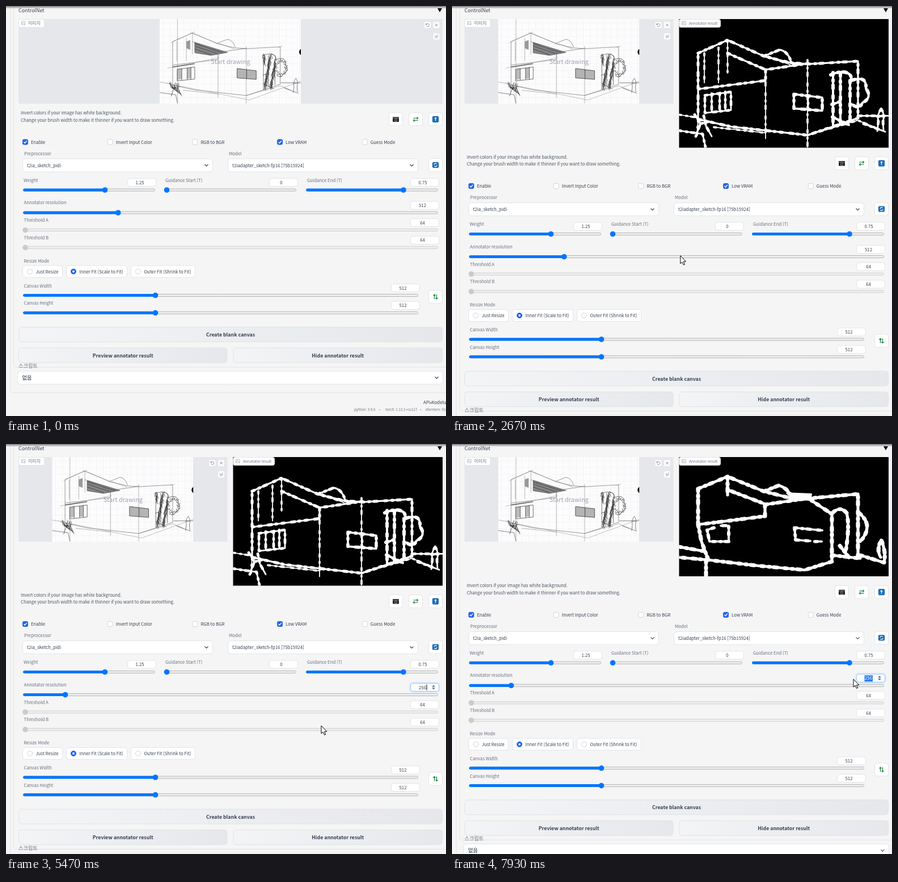
These frames come from a looping animation (776 px wide and 722 px high, 8 s). An HTML page with a canvas:

```html
<!DOCTYPE html>
<html lang="ko">
<head>
<meta charset="utf-8">
<style>
html, body { margin: 0; width: 100%; height: 100%; overflow: hidden; background: #f5f5f5; }
canvas { display: block; }
</style>
</head>
<body>
<canvas id="stage" width="776" height="722"></canvas>
<script>
const c = document.getElementById('stage').getContext('2d');
const FONT = '"Noto Sans CJK KR", "Noto Sans CJK JP", "Noto Sans CJK", "Source Sans Pro", sans-serif';
const BLUE = '#0075ff', LINE = '#e2e4e8', GREY = '#6b7280', DARK = '#374151', BG = '#f5f5f5';
const LOOP = 8000;

// House drawing, in the 370 x 226 space of the annotator result
const WALLS = new Path2D('M34 60L86 37L152 66L198 77L230 79L316 74V174L227 204L92 189L34 176V60' +
  'M86 60L153 89L228 78M153 89V108L34 123M150 65L178 54Q192 56 198 75');
const UPRIGHTS = new Path2D('M86 37V95M70 50V112M153 89V210M227 72V225M45 60V112M34 176L32 204M158 66L196 80' +
  'M227 204L316 178L345 190M0 168L32 173M62 190L153 200');
const WINDOW = new Path2D('M203 132L253 138V161L203 157Z');
const PANES = new Path2D('M46 134L92 128V160L46 165ZM58 131V163M72 130V161M82 128V161M228 134V160');
const TREE = new Path2D('M272 94V188M285 96V182M268 98Q290 88 303 98M292 93Q306 96 304 108' +
  'Q332 98 330 122Q342 138 324 147Q318 160 306 150M270 150L285 145M271 172L300 186M302 108V176');
const PEOPLE = new Path2D('M357 158Q349 168 352 180L350 197M357 158Q364 168 360 180L361 195M350 171H362' +
  'M318 170H370M326 184L364 198M28 168L38 184L30 206M44 170L48 188L58 206M38 184L54 180M0 196L42 202L47 225');
const BLOBS = new Path2D('M34 60L86 37L150 65L198 78L232 78L316 70V190M34 60V128L152 112V89L86 62M86 37V72' +
  'M152 90L228 78M150 65L176 54Q192 58 200 78M34 128L40 160L52 195L140 206L222 214L270 198V108L228 78' +
  'M52 195L0 190M0 170L42 178M48 196V225M320 186L362 200Q366 180 357 157Q348 176 356 190M270 186L320 192' +
  'M272 105Q285 92 296 106Q302 130 294 180M318 106Q345 130 320 160M284 168L300 190');
const BLOB_PANES = new Path2D('M62 134L50 138L54 160H88V130H74M204 134L253 139M204 134L206 157L232 159M240 160H252');

const ARROW = new Path2D('M0 0V14L3.2 11.2L5.6 16.4L7.8 15.4L5.4 10.4H9.8Z');
const HAND = new Path2D('M-1.3 1.4Q0 -.9 1.3 1.4V7.2Q2.8 6 3.8 7.4Q5.2 6.5 6.2 8Q8.7 7.2 8.8 9.8V13Q8.4 16 6.8 18.5' +
  'H-.6Q-2 15 -4.6 11.6Q-4.4 9 -1.3 11.5Z');
const IBEAM = new Path2D('M-2 -6H2M0 -6V6M-2 6H2');

// Pointer path: time, x, y
const MOVES = [[600, 650, 4], [1130, 268, 628], [2470, 268, 628], [2930, 600, 164], [3070, 600, 164],
  [3400, 577, 530], [3870, 736, 428], [3930, 738, 428], [4130, 724, 428], [4270, 708, 430], [5200, 708, 430],
  [5470, 556, 496], [5930, 316, 686], [6800, 316, 686], [7250, 560, 312], [7600, 740, 413],
  [7670, 740, 413], [7930, 708, 414]];

const clamp = (v, a = 0, b = 1) => Math.min(b, Math.max(a, v));

function pointer(t) {
  const i = MOVES.findIndex(m => m[0] > t);
  if (i < 0) return MOVES[MOVES.length - 1].slice(1);
  const [a, b] = [MOVES[Math.max(0, i - 1)], MOVES[i]];
  const p = clamp((t - a[0]) / (b[0] - a[0] || 1)), e = p * p * (3 - 2 * p);
  return [a[1] + (b[1] - a[1]) * e, a[2] + (b[2] - a[2]) * e];
}

function text(s, x, y, size = 7.8, color = GREY, align = 'left', weight = 400) {
  c.font = `${weight} ${size}px ${FONT}`;
  c.fillStyle = color;
  c.textAlign = align;
  c.fillText(s, x, y);
}

function box(x, y, w, h, r = 4, fill = '#fff', stroke = LINE) {
  c.beginPath();
  c.roundRect(x + .5, y + .5, w - 1, h - 1, r);
  c.fillStyle = fill;
  c.fill();
  if (stroke) { c.strokeStyle = stroke; c.lineWidth = 1; c.stroke(); }
}

function path(d, x, y, color, width = 1, fill) {
  c.save();
  c.translate(x, y);
  const p = typeof d === 'string' ? new Path2D(d) : d;
  if (fill) { c.fillStyle = fill; c.fill(p); }
  if (color) { c.strokeStyle = color; c.lineWidth = width; c.stroke(p); }
  c.restore();
}

function dot(x, y, r, fill) {
  c.beginPath();
  c.arc(x, y, r, 0, 7);
  c.fillStyle = fill;
  c.fill();
}

const chevron = (x, y) => path('M-3 -1.5L0 1.5L3 -1.5', x, y, DARK, 1.1);

function slider(x, end, y, knob, off) {
  box(x, y - 2.5, end - x, 5, 2, '#efefef', off ? '#cfcfcf' : '#b4b4b4');
  if (!off) box(x, y - 2.5, knob - x, 5, 2, BLUE, BLUE);
  dot(knob, y, 4.8, off ? '#cbcbcb' : BLUE);
}

function field(x, y, value, tx) {
  box(x, y, 51, 15, 4);
  text(value, tx, y + 10.5, 7.8, DARK, 'center');
}

function select(x, y, w, h, s) {
  box(x, y, w, h, 5);
  text(s, x + 8, y + h / 2 + 3, 7.8, DARK);
  chevron(x + w - 11.5, y + h / 2);
}

function button(x, y, w, h, s, hot) {
  const g = c.createLinearGradient(x, y, x + w, y + h * 3);
  g.addColorStop(0, hot ? '#f9fafb' : '#f3f4f6');
  g.addColorStop(1, hot ? '#f3f4f6' : '#e5e7eb');
  box(x, y, w, h, 5, g, '#e0e2e6');
  text(s, x + w / 2, y + h / 2 + 3.6, 8.75, DARK, 'center', 600);
}

function picIcon(x, y) {
  path('M-3 -3H3V3H-3ZM-3 1.5L0 -.5L3 3M-1.5 -1.5H-.5', x, y, '#9ca3af', .7);
}

function tile(x, y) { box(x - 12, y - 12, 25, 24, 4); }

function swapIcon(x, y, turn) {
  c.save();
  c.translate(x, y);
  c.rotate(turn);
  path('M-4 -2H4M2 -4L4 -2L2 0M4 2H-4M-2 0L-4 2L-2 4', 0, 0, '#15803d', 1.2);
  c.restore();
}

function sketch(x) {
  c.save();
  c.translate(x, 23);
  c.beginPath();
  c.rect(0, 0, 249, 149);
  c.clip();
  c.fillStyle = '#fcfcfd';
  c.fillRect(0, 0, 249, 149);
  c.fillStyle = '#f3f3f6';
  for (let i = 6; i < 249; i += 12) { c.fillRect(i, 0, .7, 149); c.fillRect(0, i, 249, .7); }
  c.save();
  c.scale(.673, .66);
  path('M92 62L178 89L135 97L92 90Z', 0, 0, '#444', 1, '#858585');
  path('M92 66L165 89M92 72L150 92M92 80L135 95', 0, 0, '#444', 1.4);
  path(WINDOW, 0, 0, '#444', 1.3, '#b4b4b4');
  path('M46 134L58 132V160L46 163ZM72 131L82 129V158L72 160Z', 0, 0, null, 0, '#bbb');
  path('M70 60L80 56V82L70 78Z', 0, 0, null, 0, '#999');
  path(WALLS, 0, 0, '#666', 1);
  path(UPRIGHTS, 0, 0, '#777', .8);
  path(PANES, 0, 0, '#444', 1.2);
  path(TREE, 0, 0, '#555', 1.2);
  path(PEOPLE, 0, 0, '#555', 1.1);
  path('M47 0V225M30 63L92 34M80 36L160 68M20 131L156 103M310 76L322 72M20 172L235 216L370 166', 0, 0, '#888', .8);
  path('M34 128L92 119', 0, 0, '#555', 2);
  c.strokeStyle = '#333';
  c.lineWidth = 1.1;
  c.beginPath();
  for (let i = 0; i < 90; i++) {
    const a = 273 + i * 37 % 31, b = 92 + i * 53 % 86;
    c.moveTo(a, b);
    c.quadraticCurveTo(a + i % 7 - 3, b + 6, a + i * 5 % 9 - 4, b + 14);
  }
  for (let i = 0; i < 22; i++) {
    const a = i * 2.4, r = 11 + i % 5;
    c.moveTo(321 + r * Math.cos(a), 128 + 1.5 * r * Math.sin(a));
    c.arc(319 + r * Math.cos(a), 128 + 1.5 * r * Math.sin(a), 2.5, 0, 4);
  }
  for (let i = 0; i < 14; i++) {
    c.moveTo(26 + i * 11 % 32, 168 + i * 7 % 18);
    c.lineTo(29 + i * 13 % 32, 182 + i * 9 % 22);
  }
  c.stroke();
  c.restore();
  dot(252, 58, 6, '#000');
  c.restore();
}

function inputImage(wide) {
  const right = wide ? 770 : 390.5, mid = (22 + right) / 2;
  c.fillStyle = '#e5e7eb';
  c.fillRect(22, 23, right - 22, 149);
  sketch(mid - 125);
  text('Start drawing', mid, 102, 11.05, '#9ca3af', 'center');
  box(22, 23, 46, 15, 3);
  picIcon(30.5, 30);
  text('이미지', 39, 33, 8);
  for (const [x, y] of [[26.5, 33.5], [11, 33.5], [11, 53.5]]) box(right - x - 6.5, y - 6.5, 13, 13, 3);
  path('M-2.5 -1A2.8 2.8 0 1 1 -2 2M-3 -3V-.5H-.5', right - 26.5, 33.5, GREY, .8);
  path('M-2.3 -2.3L2.3 2.3M2.3 -2.3L-2.3 2.3', right - 11, 33.5, GREY, .9);
  path('M-2.5 3L3 -3M-3 -2L-1 0M0 3L3 0', right - 11, 53.5, GREY, .9);
}

// Two passes, the second dashed and wider, give the lines a ragged edge
function ragged(d, width) {
  path(d, 0, 0, '#fff', width);
  c.setLineDash([4, 9, 2, 7, 6, 13]);
  path(d, 0, 0, '#fff', width + 2);
  c.setLineDash([]);
}

function result(t) {
  const low = t >= 6530, h = low ? 210 : 226.5;
  c.save();
  if (!low) c.globalAlpha = 1 - .46 * clamp((t - 6050) / 220);
  c.fillStyle = '#000';
  c.fillRect(400.5, 23, 369.5, h);
  c.beginPath();
  c.rect(400.5, 23, 369.5, h);
  c.clip();
  c.translate(400, 23);
  c.scale(1, h / 226);
  c.lineJoin = c.lineCap = 'round';
  if (low) {
    ragged(BLOBS, 5.2);
    ragged(BLOB_PANES, 4);
    path('M190 68L234 70L232 82L200 80Z', 0, 0, '#fff', 2, '#fff');
  } else {
    ragged(WALLS, 3.2);
    ragged(UPRIGHTS, 1.8);
    ragged(WINDOW, 3.6);
    ragged(PANES, 2.8);
    ragged(TREE, 4);
    ragged(PEOPLE, 2.8);
  }
  c.scale(1, 226 / h);
  box(0, 0, 74, 15, 3);
  picIcon(9, 7);
  text('Annotator result', 18, 9.7, 6.66);
  c.restore();
}

function frameLines(dy) {
  c.strokeStyle = LINE;
  c.lineWidth = 1;
  for (const [x, y] of [[13.5, 636], [7.5, 681]]) {
    c.beginPath();
    c.moveTo(x, 0);
    c.lineTo(x, y + dy - 5);
    c.quadraticCurveTo(x, y + dy, x + 5, y + dy);
    c.lineTo(776, y + dy);
    c.stroke();
  }
}

function resolution(t, mx) {
  const value = t < 4530 ? '512' : t < 4730 ? '2' : t < 4900 ? '25' : '256';
  const focus = t >= 3930 && t < 6070 || t >= 7670;
  const selected = t >= 3930 && t < 4530 || t >= 7670;
  slider(30, 762, 364, 34.5 + 723 * clamp((value - 64) / 1984));
  if (!focus) return field(713, 343.5, value, 734.5);
  c.beginPath();
  c.roundRect(712, 342.5, 53, 17, 5);
  c.strokeStyle = '#dbeafe';
  c.lineWidth = 2;
  c.stroke();
  box(713, 343.5, 51, 15, 4, '#fff', '#93c5fd');
  if (selected) {
    const from = clamp(mx, 727.5, 742);
    c.fillStyle = '#2b7de9';
    c.fillRect(from, 346, 742 - from, 11);
  }
  text(value, 728, 354, 7.8, selected && mx < 732 ? '#fff' : DARK);
  if (t >= 4530 && t < 6070) {
    c.fillStyle = '#000';
    c.fillRect(728.5 + c.measureText(value).width, 346, 1, 10);
  }
  box(750, 346, 8, 10, 1, '#efefef', null);
  path('M-2.3 -1L0 -3.6L2.3 -1ZM-2.3 1L0 3.6L2.3 1Z', 754, 351, null, 0, '#444');
}

function controls(t, mx, hot) {
  text('Invert colors if your image has white background.', 26, 191, 7.8, '#4b5563');
  text('Change your brush width to make it thinner if you want to draw something.', 26, 203.6, 7.8, '#4b5563');
  [687, 722, 757].forEach(x => tile(x, 199.5));
  path('M-5.5 -4H5.5V4.5H-5.5Z', 687.5, 199.5, null, 0, '#222');
  path('M-5.5 -2H5.5M-2 1.5A2 2 0 1 1 2 1.5A2 2 0 1 1 -2 1.5', 687.5, 199.5, '#aaa', .8);
  swapIcon(722.5, 199.5, 0);
  box(752, 194, 11, 11, 1, '#1673c8', '#155a9c');
  path('M0 3V-3M-1.8 -1L0 -3L1.8 -1', 757.5, 199.5, '#fff', 1.1);

  ['Enable', 'Invert Input Color', 'RGB to BGR', 'Low VRAM', 'Guess Mode'].forEach((s, i) => {
    const x = 29 + i * 149.7, on = i % 3 === 0;
    box(x, 234.5, 10, 10, 2, on ? '#2563eb' : '#fff', on ? '#2563eb' : '#d1d5db');
    if (on) path('M-2.5 0L-.7 2L2.7 -2', x + 5, 239.5, '#fff', 1.4);
    text(s, x + 15, 242.5, 7.8, DARK);
  });

  text('Preprocessor', 32, 262.5);
  select(29, 268.5, 336, 24, 't2ia_sketch_pidi');
  text('Model', 393, 262.5);
  select(391, 268.5, 336, 24, 't2iadapter_sketch-fp16 [75b15924]');
  tile(757, 280);
  box(752, 275, 11, 10, 1, '#1673c8', '#155a9c');
  path('M-2.6 -.5A2.7 2.7 0 0 1 2 -2M2.6 .5A2.7 2.7 0 0 1 -2 2', 757.5, 280, '#fff', 1.2);

  text('Weight', 31, 309.5);
  field(214, 303, '1.25', 236);
  slider(30, 263, 324, 174.5);
  text('Guidance Start (T)', 281, 309.5);
  field(464, 303, '0', 485.5);
  slider(280, 512, 324, 283.5);
  text('Guidance End (T)', 531, 309.5);
  field(713, 303, '0.75', 735);
  slider(529, 762, 324, 701);

  text('Annotator resolution', 31.5, 349);
  resolution(t, mx);
  ['A', 'B'].forEach((s, i) => {
    text('Threshold ' + s, 31.5, 380 + i * 30.8);
    field(713, 374 + i * 30.8, '64', 734.5);
    slider(30, 762, 394.5 + i * 30.8, 34, true);
  });

  text('Resize Mode', 31.5, 451.5);
  [['Just Resize', 29, 71], ['Inner Fit (Scale to Fit)', 106, 108], ['Outer Fit (Shrink to Fit)', 220, 114]]
    .forEach(([s, x, w], i) => {
      box(x, 456.5, w, 22, 4);
      box(x + 8, 462.5, 10, 10, 5, i === 1 ? '#2563eb' : '#fff', i === 1 ? '#2563eb' : '#d1d5db');
      if (i === 1) dot(x + 13, 467.5, 1.9, '#fff');
      text(s, x + 23.5, 470.5, 7.8, DARK);
    });

  ['Width', 'Height'].forEach((s, i) => {
    text('Canvas ' + s, 31.5, 495.5 + i * 30.8);
    field(679, 489 + i * 30.8, '512', 700);
    slider(30, 727, 509.5 + i * 30.8, 263.5);
  });
  tile(757, 512);
  swapIcon(757.5, 512, Math.PI / 2);

  button(22, 565, 748, 27, 'Create blank canvas');
  button(22, 601.5, 368.5, 27, 'Preview annotator result', hot);
  button(400.5, 601.5, 369.5, 27, 'Hide annotator result');

  text('스크립트', 22, 637, 9.2);
  select(20, 642.5, 751, 24, '');
  text('없음', 28.5, 657.5, 9.2, '#1f2937');
  text('API•Kodelum', 736, 700.5, 7.8, DARK);
  [['python: 3.9.6', 614], ['•', 658], ['torch: 1.13.1+cu117', 669], ['•', 730], ['xformers: N/A', 740]]
    .forEach(([s, x]) => text(s, x, 712.5, 6.2));
}

function cursor(t, x, y, dy, hot) {
  if (t < 600) return;
  const inField = x > 713 && x < 764 && Math.abs(y - 351 - dy) < 8;
  if (inField) path(IBEAM, x, y, '#222', 1);
  else if (hot || t >= 1870 && t < 2270) {
    path(HAND, x, y, '#000', 1, '#fff');
    path('M1.3 7V10M3.8 8V10.5M6.2 8.5V11', x, y, '#000', .8);
  } else path(ARROW, x, y, '#000', 1, '#fff');
}

function draw(t) {
  const dy = t < 1870 ? 0 : t < 6530 ? 77.5 : 61.3;
  const [mx, my] = pointer(t);
  const hot = t >= 600 && mx > 22 && mx < 390 && my > 601 + dy && my < 629 + dy;
  c.fillStyle = BG;
  c.fillRect(0, 0, 776, 722);
  frameLines(dy);
  text('ControlNet', 22, 10.5, 8.9, DARK);
  path('M-4 -3.5H4L0 3.5Z', 765, 7.5, null, 0, '#000');
  inputImage(t < 1870);
  if (t >= 1870) result(t);
  c.save();
  c.translate(0, dy);
  controls(t, mx, hot);
  c.restore();
  const shade = c.createLinearGradient(0, 0, 0, 5);
  shade.addColorStop(0, 'rgba(0,0,0,.5)');
  shade.addColorStop(1, 'rgba(0,0,0,0)');
  c.fillStyle = shade;
  c.fillRect(0, 0, 776, 5);
  cursor(t, mx, my, dy, hot);
}

const start = performance.now();
function tick() {
  draw((performance.now() - start) % LOOP);
  requestAnimationFrame(tick);
}
tick();
</script>
</body>
</html>
```
